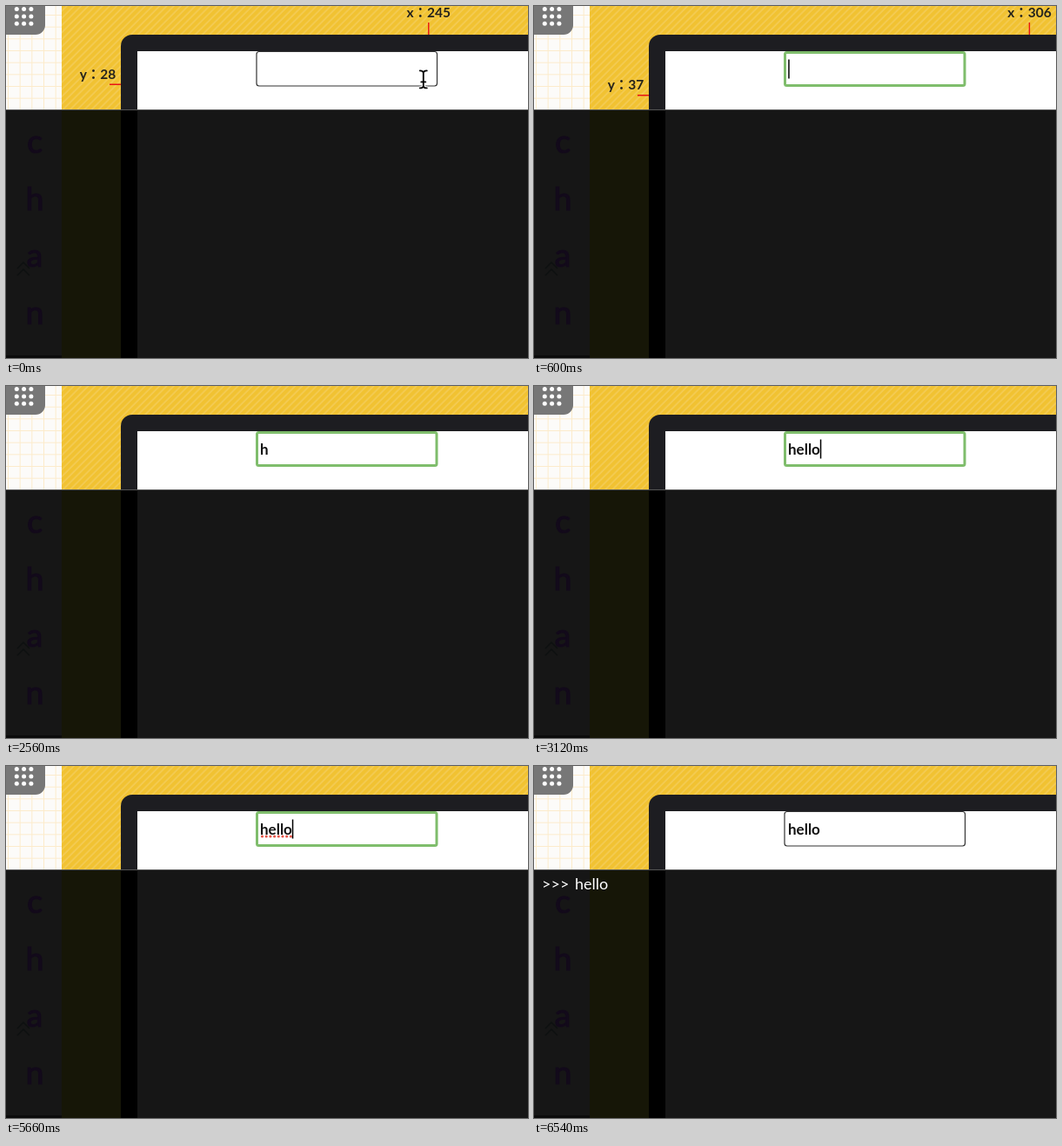
Write an HTML page that moves like this. It is 600 by 405 pixels and loops after 6.56 s.

```html
<!DOCTYPE html>
<html lang="ja">
<head>
<meta charset="utf-8">
<style>
html, body { margin: 0; width: 100%; height: 100%; overflow: hidden; }
svg { display: block; width: 600px; height: 405px; }
text { font-family: Lato, "Noto Sans CJK JP", sans-serif; white-space: pre; }
.label { font-size: 15.5px; font-weight: 700; fill: #25231c; text-anchor: middle; }
#arrow { filter: drop-shadow(0 1.5px 1.5px #0006); }
</style>
</head>
<body>
<svg viewBox="0 0 600 405">
  <defs>
    <pattern id="grid" width="13.67" height="13.67" patternUnits="userSpaceOnUse" x="2" y="10">
      <path d="M.5 0V14M0 .5H14" stroke="#fcebcb"/>
    </pattern>
    <pattern id="stripes" width="5.8" height="5.8" patternUnits="userSpaceOnUse" patternTransform="rotate(45)">
      <path d="M3 0V6" stroke="#f6d16c"/>
    </pattern>
  </defs>

  <rect width="600" height="405" fill="#fcfbf9"/>
  <rect width="64" height="119" fill="url(#grid)"/>
  <rect x="64" width="536" height="119" fill="#f1c232"/>
  <rect x="64" width="536" height="119" fill="url(#stripes)"/>
  <rect y="-12" x="-12" width="57" height="45" rx="11" fill="#777"/>
  <g id="dots" fill="#fff"></g>

  <g id="labels">
    <text id="xText" class="label" y="13"></text>
    <text id="yText" class="label" x="105.5"></text>
    <path id="ticks" stroke="#e81414" stroke-width="1.4"/>
  </g>

  <rect x="132" y="33" width="500" height="400" rx="13" fill="#1d1d21"/>
  <rect x="151" y="52" width="449" height="67" fill="#fff"/>
  <rect id="field" fill="#fff"/>
  <text id="typed" x="292" y="79" font-size="17" font-weight="700" fill="#111"></text>
  <path id="squiggle" d="M294.5 81H329" stroke="#e8584c" stroke-width="3.2" stroke-linecap="round" stroke-dasharray="0 4.7"/>
  <rect id="caret" y="61.5" width="1.5" height="22" fill="#000"/>

  <rect y="119" width="600" height="286" fill="#161616"/>
  <rect x="64" y="119" width="68" height="286" fill="#161607"/>
  <rect x="132" y="119" width="19" height="286" fill="#000"/>
  <rect y="402" width="64" height="3" fill="#0b0b0b"/>
  <path d="M0 119.5H600" stroke="#555"/>
  <g id="side" font-size="37" fill="#130a1b" stroke="#130a1b" stroke-width="1.2" text-anchor="middle"></g>
  <path d="M13 302l7-7 7 7M13 310l7-7 7 7" fill="none" stroke="#0d1010" stroke-width="1.5"/>
  <text id="output" x="9" y="142" font-size="18" fill="#fff" word-spacing="2">&gt;&gt;&gt; hello</text>

  <g id="beam" fill="none" stroke-linecap="round">
    <path d="M-4 -10Q0 -10 0 -7Q0 -10 4 -10M0 -7V7M-4 10Q0 10 0 7Q0 10 4 10M-2.5 3H2.5" stroke="#fff" stroke-width="4"/>
    <path d="M-4 -10Q0 -10 0 -7Q0 -10 4 -10M0 -7V7M-4 10Q0 10 0 7Q0 10 4 10M-2.5 3H2.5" stroke="#000" stroke-width="1.8"/>
  </g>
  <path id="arrow" d="M0 0V19L4.4 15L7.6 22.5L11 21L7.8 13.7H13.5Z" fill="#000" stroke="#fff" stroke-width="1.4"/>
</svg>
<script>
const LOOP = 6560, SCALE = 1.367, LEFT = 151, TOP = 52;
const $ = id => document.getElementById(id);
const show = (id, on) => $(id).style.display = on ? "" : "none";
const set = (id, attrs) => {
  for (const key in attrs) $(id).setAttribute(key, attrs[key]);
};

for (let i = 0; i < 9; i++)
  $("dots").innerHTML += `<circle cx="${12.3 + i % 3 * 8.3}" cy="${3.5 + Math.floor(i / 3) * 8.4}" r="2.5"/>`;
[..."chan"].forEach((letter, i) =>
  $("side").innerHTML += `<text x="33" y="${169 + i * 65.5}">${letter}</text>`);

// Pointer paths: [time, x, y] in page coordinates
const firstVisit = [[0, 245, 28], [180, 224, 19], [430, 222, 18], [600, 306, 37], [660, 312, 44]];
const lastVisit = [[5740, 334, 31], [5900, 296, 24], [6060, 291, 22], [6240, 292, 23], [6460, 330, 40]];
const keyTimes = [2540, 2660, 2780, 2920, 3120];
const caretEnds = [292.2, 301.5, 310.5, 315, 319.2, 328.8];
const caretOn = [[420, 920], [1220, 1620], [1920, 2320], [2620, 3620],
                 [3920, 4320], [4620, 5020], [5320, 6080]];

function along(path, t) {
  let i = 1;
  while (i < path.length - 1 && t > path[i][0]) i++;
  const [a, b] = [path[i - 1], path[i]];
  const u = Math.min(1, Math.max(0, (t - a[0]) / (b[0] - a[0])));
  return [1, 2].map(k => a[k] + (b[k] - a[k]) * u);
}

function drawPointer(t) {
  const first = t < 3000;
  const path = first ? firstVisit : lastVisit;
  const visible = t >= path[0][0] && t < path[path.length - 1][0];
  show("labels", visible);
  const [x, y] = along(path, t);
  const px = LEFT + x * SCALE, py = TOP + y * SCALE;
  $("xText").textContent = "x：" + Math.round(x);
  $("yText").textContent = "y：" + Math.round(y);
  set("xText", { x: px });
  set("yText", { y: py - 6.5 });
  set("ticks", { d: `M${px} 19V33M119 ${py}H132` });

  // The cursor runs slightly ahead of its readout
  const [ax, ay] = along(path, t + 30);
  const cx = LEFT + ax * SCALE, cy = TOP + ay * SCALE;
  const cursor = visible && (!first || t < 540);
  const overField = cx < 496 && cy < 93;
  show("beam", cursor && overField);
  show("arrow", cursor && !overField);
  set("beam", { transform: `translate(${cx - 1.2} ${cy - 3.7})` });
  set("arrow", { transform: `translate(${cx + 2.8} ${cy})` });
}

function draw(t) {
  const focused = t >= 420 && t < 6080;
  set("field", focused
    ? { x: 288.5, y: 53.5, width: 206.5, height: 38, rx: 2, stroke: "#7fbd6c", "stroke-width": 3 }
    : { x: 288, y: 52.5, width: 207.5, height: 39.5, rx: 3, stroke: "#333", "stroke-width": 1.2 });
  const count = keyTimes.filter(k => t >= k).length;
  $("typed").textContent = "hello".slice(0, count);
  set("caret", { x: caretEnds[count] });
  show("caret", caretOn.some(([on, off]) => t >= on && t < off));
  show("squiggle", t >= 4800 && t < 6080);
  show("output", t >= 6080);
  drawPointer(t);
}

const start = performance.now();
function tick() {
  draw((performance.now() - start) % LOOP);
  requestAnimationFrame(tick);
}
tick();
</script>
</body>
</html>
```
